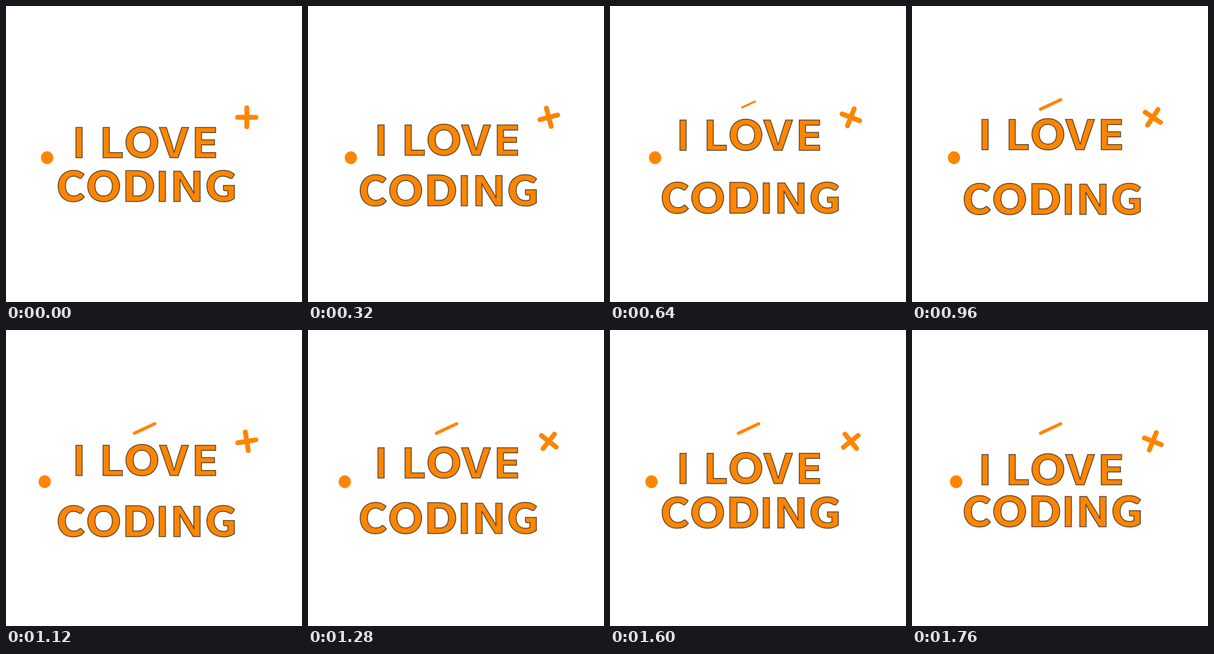
These frames come from a looping animation (480x480 px, 1.8 s). An HTML page:

```html
<!DOCTYPE html>
<html lang="en">
<head>
<meta charset="utf-8">
<title>I love coding</title>
<style>
  html, body { margin: 0; width: 100%; height: 100%; overflow: hidden; background: #fff; }
  svg { display: block; width: 100%; height: 100%; }
  text {
    font: 700 67.5px Inter, sans-serif;
    text-anchor: middle;
    fill: #ff8500;
    stroke: #5c4938;
    stroke-width: 1.5;
  }
  .round { font: 900 68.5px Lato, sans-serif; }
  .mark { stroke: #ff8500; stroke-linecap: round; fill: none; }
</style>
</head>
<body>
<svg viewBox="0 0 480 480">
  <ellipse id="dot" cy="246" rx="10.1" ry="10.4" fill="#ff8500"/>
  <path id="slash" class="mark" stroke-width="5.2" d="M-16.4 7.7L16.4-7.7"/>
  <path id="plus" class="mark" stroke-width="7.9" d="M-14.8 0H14.8M0-15.2V15.2"/>
  <text id="top" x="118.5 140 172 220.5 272.5 323">I L<tspan class="round">O</tspan>VE</text>
  <text id="bottom" x="105 158.5 215.5 253.5 293.5 348.5"><tspan class="round">COD</tspan>IN<tspan class="round">G</tspan></text>
</svg>
<script>
  const LOOP = 1800, STEP = 40;
  const [dot, slash, plus, upper, lower] =
    ['dot', 'slash', 'plus', 'top', 'bottom'].map(id => document.getElementById(id));

  const ease = p => p * p * (3 - 2 * p);

  // Eased value at time t through keys of [time, value]
  function track(t, ...keys) {
    let [t0, v0] = keys[0];
    if (t <= t0) return v0;
    for (const [t1, v1] of keys) {
      if (t < t1) return v0 + (v1 - v0) * ease((t - t0) / (t1 - t0));
      [t0, v0] = [t1, v1];
    }
    return v0;
  }

  function draw(t) {
    upper.setAttribute('y', track(t, [0, 246], [840, 232.3], [LOOP, 251]));
    lower.setAttribute('y', track(t, [0, 317], [840, 339], [LOOP, 318.5]));
    dot.setAttribute('cx', track(t, [0, 66.7], [710, 73.3], [1310, 59.5], [LOOP, 71.8]));
    const turn = track(t, [70, 0], [2150, -373]);
    plus.setAttribute('transform', `translate(390.5 180.5) rotate(${turn})`);
    const size = track(t, [240, 0], [920, 1]);
    slash.setAttribute('transform', `translate(224.7 159.7) scale(${size})`);
    slash.style.display = size ? '' : 'none';
  }

  function frame() {
    const t = performance.now() % LOOP;
    draw(Math.floor(t / STEP) * STEP);
    requestAnimationFrame(frame);
  }
  frame();
</script>
</body>
</html>
```
